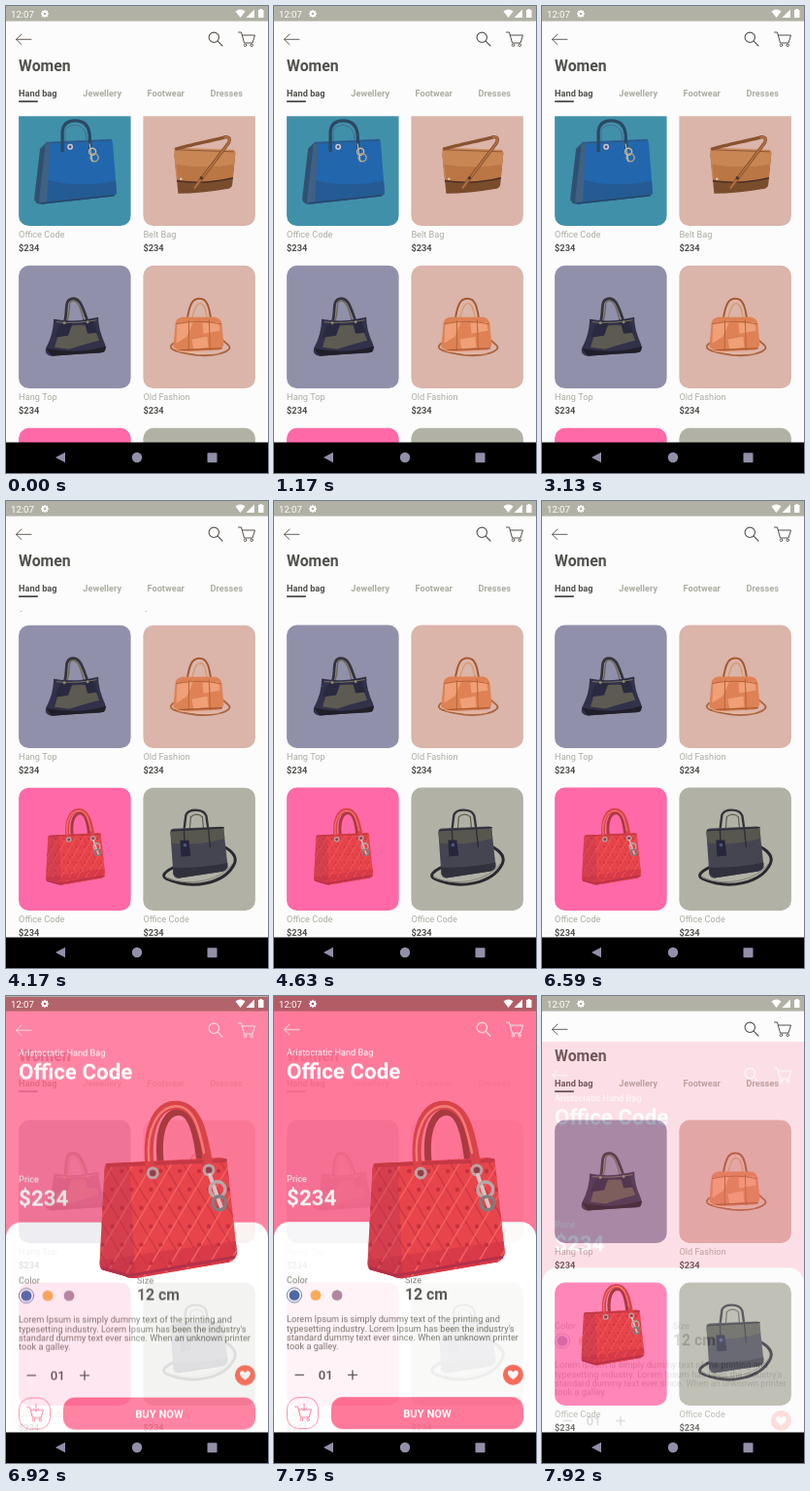
Write an HTML page with a canvas that moves like this. It is 270 by 480 pixels and loops after 8000 ms.

```html
<!DOCTYPE html>
<html lang="en">
<head>
<meta charset="utf-8">
<title>Hand bag shop</title>
<style>
  html, body { margin: 0; width: 100%; height: 100%; overflow: hidden; background: #000; }
  canvas { display: block; width: 270px; height: 480px; }
</style>
</head>
<body>
<canvas id="stage"></canvas>
<script>
const W = 270, H = 480, NAV_Y = 448.5, LIST_Y = 113.3, LOOP = 8000;
const FONT = 'Roboto, sans-serif';
const INK = '#50504c', MUTED = '#acaca2', PAPER = '#fcfcfc', CORAL = '#ff6e92';
const ratio = Math.max(1, window.devicePixelRatio || 1);

function makeLayer(canvas) {
  canvas.width = W * ratio;
  canvas.height = H * ratio;
  const c = canvas.getContext('2d');
  c.scale(ratio, ratio);
  c.lineJoin = c.lineCap = 'round';
  return c;
}
const screen = makeLayer(document.getElementById('stage'));
const detailCanvas = document.createElement('canvas');
const detail = makeLayer(detailCanvas);

// Timing helpers
const clamp = x => Math.min(1, Math.max(0, x));
const lerp = (a, b, k) => a + (b - a) * k;
function bezier(x1, y1, x2, y2) {
  const at = (a, b, s) => 3 * a * s * (1 - s) ** 2 + 3 * b * s * s * (1 - s) + s ** 3;
  return x => {
    let lo = 0, hi = 1;
    for (let i = 0; i < 24; i++) {
      const mid = (lo + hi) / 2;
      if (at(x1, x2, mid) < x) lo = mid; else hi = mid;
    }
    return at(y1, y2, lo);
  };
}
const fastOutSlowIn = bezier(0.4, 0, 0.2, 1);
const easeIn = bezier(0.42, 0, 1, 1);
const drag = bezier(0.3, 0.1, 0.3, 1);

// Drawing helpers
function text(c, str, x, y, size, color, weight = 400, align = 'left') {
  c.font = `${weight} ${size}px ${FONT}`;
  c.textAlign = align;
  c.fillStyle = color;
  c.fillText(str, x, y);
}
function fill(c, path, color) {
  c.fillStyle = color;
  c.fill(new Path2D(path));
}
function line(c, path, color, width = 1) {
  c.strokeStyle = color;
  c.lineWidth = width;
  c.stroke(new Path2D(path));
}
function disc(c, x, y, r, color) {
  c.beginPath();
  c.arc(x, y, r, 0, 7);
  c.fillStyle = color;
  c.fill();
}
function ring(c, x, y, r, color, width = 1) {
  c.beginPath();
  c.arc(x, y, r, 0, 7);
  c.strokeStyle = color;
  c.lineWidth = width;
  c.stroke();
}
function box(c, x, y, w, h, r, color) {
  c.beginPath();
  c.roundRect(x, y, w, h, r);
  c.fillStyle = color;
  c.fill();
}

// Bags, placed relative to the top left of their card
function blueBag(c) {
  fill(c, 'M28 41 L22 47 L16 98 Q16 104 24 104 L33 102 Z', '#31506f');
  fill(c, 'M28 40 L95 37 Q97 38 97 42 L101 93 Q100 95 96 96 L24 104 Q21 104 21 100 Z', '#2266ad');
  fill(c, 'M26 78 Q58 88 100 80 L101 93 L96 96 L24 104 L21 100 Z', '#245b94');
  fill(c, 'M28 40 L32 42 L29 102 L24 104 L21 100 Z', '#3f6183');
  line(c, 'M29 41 L95 38', '#34567d', 1.3);
  line(c, 'M23 103 L98 95', '#284765', 1.4);
  line(c, 'M45 49 L45 29 C46 21 51 18 58 18 C67 18 72 23 73 32 L74 51', '#2b4964', 3.3);
  line(c, 'M48 39 L48 28 C50 22 65 19 69 31 L70 39', '#426d86', 1);
  ring(c, 53, 45, 2.2, '#d1c7ce', 1.5);
  disc(c, 53, 45, 1, '#63475e');
  ring(c, 76, 50, 3.5, '#c8bda5', 1.4);
  ring(c, 78, 56, 4, '#a89f8b', 1.6);
  line(c, 'M73 42 L76 60', '#d3c8b0', 1);
}
function beltBag(c) {
  fill(c, 'M32 52 L36 93 Q59 93 88 88 Q92 87 92 82 L95 51 Z', '#794d2c');
  fill(c, 'M32 49 Q32 46 36 46 L92 48 Q95 48 95 52 L92 77 Q61 83 36 80 Q33 78 32 49 Z', '#c98655');
  fill(c, 'M34 63 Q64 68 93 63 L92 77 Q61 83 36 80 Z', '#bb7645');
  line(c, 'M35 80 Q64 84 92 77', '#4c3024', 1.4);
  line(c, 'M34 48 L93 50', '#8f5a38', 1);
  line(c, 'M34 47 C48 43 78 37 84 35 Q91 34 88 41 L53 87', '#8a522f', 3.4);
  line(c, 'M84 35 Q91 34 88 41 L53 87', '#b77848', 1.4);
  disc(c, 60, 77, 1.7, '#563524');
  disc(c, 39, 78, 1.2, '#ded0b0');
}
function hangBag(c) {
  line(c, 'M47 58 C51 49 46 35 55 34 C64 33 66 44 71 57', '#35343d', 2.8);
  line(c, 'M50 57 C54 45 50 36 56 36 C62 36 65 47 67 57', '#6b6650', 1.3);
  fill(c, 'M36 55 Q58 59 82 53 Q82 66 89 81 Q92 89 84 90 L62 91 L34 93 Q26 92 28 85 Q36 70 36 55 Z', '#32314a');
  fill(c, 'M43 63 Q60 60 77 62 L83 77 Q64 82 52 86 L37 84 Z', '#5d5a51');
  fill(c, 'M47 57 L56 58 L51 72 L37 74 L41 63 Z M67 56 L76 55 L81 69 L71 70 Z', '#29293f');
  fill(c, 'M28 85 Q60 92 90 83 L88 89 L62 91 L34 93 Z', '#201e28');
  line(c, 'M39 58 Q59 60 80 56', '#74705f', 1);
  disc(c, 47, 59, 1.5, '#8d856d');
  disc(c, 71, 58, 1.5, '#8d856d');
}
function travelBag(c) {
  line(c, 'M45 57 C48 38 51 34 58 34 C66 34 68 42 70 57', '#a45a30', 2);
  line(c, 'M50 56 C53 41 56 38 60 39 C64 41 65 48 66 56', '#d59b6f', 1.4);
  line(c, 'M31 80 C23 86 34 89 55 92 C74 94 94 88 88 82 L80 75', '#a9653e', 1.8);
  fill(c, 'M33 61 Q33 54 40 53 L74 53 Q80 54 81 60 L83 81 Q82 87 76 87 L38 89 Q31 88 31 83 Z', '#de8255');
  fill(c, 'M35 60 L52 57 L45 73 L34 80 Z M61 59 L78 58 L79 67 L62 70 Z M50 76 L66 73 L67 84 L52 86 Z', '#f09f76');
  line(c, 'M34 60 Q57 55 80 60 M47 57 L47 87 M68 56 L69 87', '#b6653b', 1);
  line(c, 'M33 87 L81 85', '#a65830', 1.3);
  line(c, 'M30 84 C35 89 58 92 78 90', '#ebbd9d', 0.8);
}
function greyBag(c) {
  line(c, 'M82 60 Q98 68 94 78 C84 99 50 105 25 94 Q15 90 31 82', '#2a2930', 3);
  line(c, 'M23 92 C44 102 79 97 92 78', '#85847a', 1);
  line(c, 'M42 44 L44 28 Q46 23 54 23 Q63 23 65 29 L67 43', '#34333a', 2.4);
  line(c, 'M48 42 L49 30 Q55 25 61 30 L62 41', '#5c5a4e', 1.2);
  fill(c, 'M28 46 Q28 42 32 42 L80 40 Q83 40 83 44 L87 80 Q87 85 82 86 L36 93 Q32 93 31 89 Z', '#454552');
  fill(c, 'M28 45 L83 42 L84 52 Q58 60 29 57 Z', '#57574f');
  fill(c, 'M31 82 Q61 83 87 77 L87 82 L82 86 L36 93 L31 89 Z', '#31313d');
  line(c, 'M29 44 L83 41 M42 44 L43 64 M67 42 L69 61', '#2c2b33', 1.3);
  fill(c, 'M38 54 L47 54 L49 70 L39 71 Z', '#25263c');
  disc(c, 43, 59, 1.8, '#4f587c');
}
// Drawn at full size, 143 by 184
function quiltedBag(c, x, y, scale) {
  c.save();
  c.translate(x, y);
  c.scale(scale, scale);
  line(c, 'M64 72 C58 32 68 12 82 12 C96 12 101 36 104 66', '#a93a40', 7);
  const body = 'M5 71 Q5 65 12 65 L125 59 Q131 59 132 65 L142 156 Q142 164 134 167 L40 183 Q32 185 25 181 L3 175 Q0 173 0 168 Z';
  fill(c, body, '#e8444c');
  c.save();
  c.clip(new Path2D(body));
  fill(c, 'M0 165 L143 145 V170 L0 190 Z', '#d93a48');
  for (let i = -9; i < 18; i++) {
    line(c, `M${i * 20} 55 l80 135`, '#cf3844', 1.5);
    line(c, `M${i * 20 + 1} 55 l-80 135`, '#f2625f', 1.5);
  }
  for (let r = 0; r < 6; r++)
    for (let k = 0; k < 8; k++)
      disc(c, k * 20 + (r % 2) * 10 + 3, 73 + r * 19, 2.2, '#c7303f');
  fill(c, 'M0 60 L31 60 L37 190 H0 Z', 'rgba(170,50,80,.3)');
  c.restore();
  line(c, 'M8 67 L130 62', '#c43945', 4);
  line(c, 'M3 173 L30 181 L139 162', '#b3304a', 3);
  line(c, 'M53 77 C46 32 58 5 79 5 C102 5 108 35 114 74', '#d9434a', 9);
  line(c, 'M51 62 C48 30 60 7 79 6 C98 6 103 30 108 54', '#f57b76', 2.5);
  for (const [rx, ry] of [[55, 75], [113, 72]]) {
    ring(c, rx, ry, 5, '#b9a3a5', 3);
    disc(c, rx, ry, 3, '#87434c');
  }
  line(c, 'M114 77 L126 111', '#d6c3c2', 4);
  ring(c, 122, 92, 8, '#b6a9a8', 3.5);
  ring(c, 124, 106, 7, '#857a7c', 3.5);
  c.restore();
}

const HERO_SCALE = 0.43;
const products = [
  ['Office Code', '#4190aa', blueBag],
  ['Belt Bag', '#dbb4aa', beltBag],
  ['Hang Top', '#9190aa', hangBag],
  ['Old Fashion', '#dbb4aa', travelBag],
  ['Office Code', '#ff69a7', c => quiltedBag(c, 28, 21, HERO_SCALE)],
  ['Office Code', '#b1b1a5', greyBag],
];
const HERO = 4;

function toolbar(c, color) {
  line(c, 'M26 34.3 H10.5 M16 29 L10.5 34.3 L16 39.6', color, 0.9);
  ring(c, 214.3, 32.3, 5.2, color, 1.1);
  line(c, 'M218.2 36.2 L223 41', color, 1.1);
  cart(c, 248, 34, color);
}
function cart(c, x, y, color) {
  c.save();
  c.translate(x, y);
  line(c, 'M-8.5 -7 H-5.5 L-2.5 4 H6 L8.5 -4 H-4.7', color, 1);
  ring(c, -1.5, 6.3, 1.3, color, 0.9);
  ring(c, 5.2, 6.3, 1.3, color, 0.9);
  c.restore();
}

function drawList(c, scroll, hideHero) {
  c.fillStyle = PAPER;
  c.fillRect(0, 0, W, H);
  toolbar(c, '#56504a');
  text(c, 'Women', 13.1, 67.3, 15.8, INK, 700);
  [['Hand bag', 13.1], ['Jewellery', 79.3], ['Footwear', 145.5], ['Dresses', 210.6]]
    .forEach(([name, x], i) => text(c, name, x, 92.6, 9.2, i ? MUTED : INK, 700));
  c.fillStyle = '#202020';
  c.fillRect(13.1, 97.4, 19.7, 1.4);

  c.save();
  c.beginPath();
  c.rect(0, LIST_Y, W, H);
  c.clip();
  products.forEach(([name, color, bag], i) => {
    c.save();
    c.translate(i % 2 ? 141.4 : 13.1, LIST_Y + Math.floor(i / 2) * 167 - scroll);
    box(c, 0, 0, 115.5, 126.3, 10.5, color);
    if (i !== HERO || !hideHero) bag(c);
    text(c, name, 0, 138.4, 9.2, MUTED);
    text(c, '$234', 0, 151.9, 9.2, INK, 700);
    c.restore();
  });
  c.restore();
}

function drawDetail(c) {
  c.clearRect(0, 0, W, H);
  c.fillStyle = CORAL;
  c.fillRect(0, 0, W, H);
  toolbar(c, '#fff');
  text(c, 'Aristocratic Hand Bag', 13.1, 61.4, 9.2, '#fff');
  text(c, 'Office Code', 13.1, 84.8, 22.3, '#fff', 700);
  text(c, 'Price', 13.1, 191.4, 9.2, '#fff');
  text(c, '$234', 13.1, 214.8, 22.3, '#fff', 700);
  box(c, 0, 232, W, 260, [15.8, 15.8, 0, 0], '#fff');

  const soft = '#73736a';
  text(c, 'Color', 13.1, 294.7, 9.2, soft);
  ring(c, 21, 307.4, 7.6, '#356c95', 0.8);
  ['#3f67a8', '#fab04e', '#a98a9f'].forEach((color, i) => disc(c, 21 + i * 22, 307.4, 5.4, color));
  text(c, 'Size', 135, 294.7, 9.2, soft);
  text(c, '12 cm', 135, 312.2, 15.8, INK, 700);
  ['Lorem Ipsum is simply dummy text of the printing and',
   "typesetting industry. Lorem Ipsum has been the industry's",
   'standard dummy text ever since. When an unknown printer',
   'took a galley.'].forEach((row, i) => text(c, row, 13.1, 335.4 + i * 9.3, 9.2, soft));

  line(c, 'M22 389.3 H30.5 M76.5 389.3 H85.5 M81 384.8 V393.8', INK, 1.3);
  text(c, '01', 53.2, 393.9, 13.1, INK, 500, 'center');
  disc(c, 246.4, 389.2, 10.5, '#ff6450');
  fill(c, 'M246.4 394 C236 387 243 382 246.4 386.3 C249.8 382 256.8 387 246.4 394 Z', '#fff');

  c.beginPath();
  c.roundRect(13.5, 412.5, 32, 32, 11.8);
  c.strokeStyle = CORAL;
  c.lineWidth = 0.8;
  c.stroke();
  cart(c, 30, 429, CORAL);
  line(c, 'M31 419 V426 M28.5 423.5 L31 426 L33.5 423.5', CORAL, 0.9);
  box(c, 59, 412, 198, 33, 11.8, CORAL);
  text(c, 'BUY NOW', 158, 432.8, 11.2, '#fff', 700, 'center');
}

function drawSystemBars(c) {
  c.fillStyle = 'rgba(37,37,3,.35)';
  c.fillRect(0, 0, W, 15.6);
  text(c, '12:07', 5, 11.6, 9.6, '#fff');
  for (let i = 0; i < 8; i++) {
    const a = i * Math.PI / 4;
    line(c, `M${40 + 2.5 * Math.cos(a)} ${8 + 2.5 * Math.sin(a)} l${Math.cos(a)} ${Math.sin(a)}`, '#fff', 1.3);
  }
  ring(c, 40, 8, 2.2, '#fff', 1.7);
  fill(c, 'M236.5 5.5 Q241.5 1.5 246.5 5.5 L241.5 12 Z', '#fff');
  fill(c, 'M256 3.5 V12 H247.5 Z', '#fff');
  fill(c, 'M260 4 H261.5 V3 H264 V4 H265.5 V12 H260 Z', '#fff');
  c.fillStyle = '#000';
  c.fillRect(0, NAV_Y, W, H - NAV_Y);
  const key = '#9190a9';
  fill(c, 'M51 464 L61 458.8 V469.2 Z', key);
  disc(c, 135, 464, 5.2, key);
  box(c, 207.5, 459.2, 10, 10, 0.8, key);
}

// [start, end, from, to]
const swipes = [[3480, 4200, 13.5, 152.7], [4800, 5380, 152.7, 0], [5900, 6480, 0, 152.7]];
function scrollAt(t) {
  let y = swipes[0][2];
  for (const [start, end, from, to] of swipes)
    if (t >= start) y = lerp(from, to, drag(clamp((t - start) / (end - start))));
  return y;
}

const OPEN = 6650, CLOSE = 7736, ROUTE_MS = 300;
function draw(t) {
  const c = screen;
  const scroll = scrollAt(t);
  const closing = t >= CLOSE;
  const v = closing ? 1 - clamp((t - CLOSE) / ROUTE_MS) : clamp((t - OPEN) / ROUTE_MS);
  drawList(c, scroll, v > 0);
  if (v > 0) {
    c.globalAlpha = easeIn(v);
    c.drawImage(detailCanvas, 0, 112 * (1 - fastOutSlowIn(v)), W, H);
    c.globalAlpha = 1;
    // The bag flies on an arc between its card and the detail page
    const p = closing ? 1 - fastOutSlowIn(1 - v) : fastOutSlowIn(v);
    const scale = lerp(HERO_SCALE, 1, p ** 1.4);
    const cardY = LIST_Y + 334 - scroll + 21 + 92 * HERO_SCALE;
    const cx = lerp(41 + 71.5 * HERO_SCALE, 168.5, 1 - Math.cos(p * Math.PI / 2));
    const cy = lerp(cardY, 198, p);
    quiltedBag(c, cx - 71.5 * scale, cy - 92 * scale, scale);
  }
  drawSystemBars(c);
}

drawDetail(detail);
const began = performance.now();
function tick() {
  draw((performance.now() - began) % LOOP);
  requestAnimationFrame(tick);
}
tick();
</script>
</body>
</html>
```
